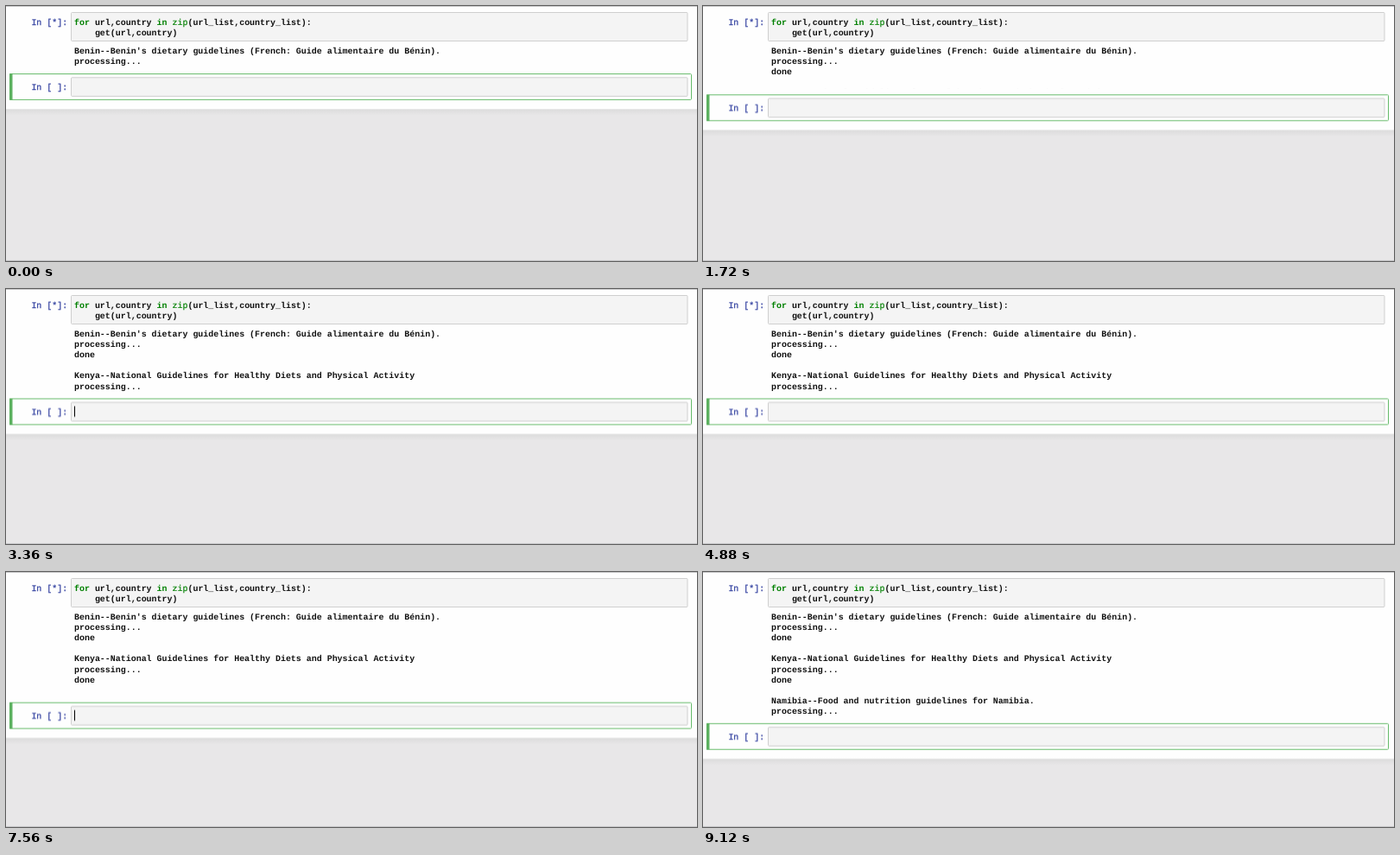
Recreate the animation shown at these times as an HTML page. Size 800 by 295 pixels, loop 9400 ms.

```html
<!DOCTYPE html>
<html lang="en">
<head>
<meta charset="utf-8">
<title>Notebook run</title>
<style>
  html, body { margin: 0; width: 100%; height: 100%; overflow: hidden; background: #e8e7e8; }
  svg { display: block; width: 800px; height: 295px; }
  text {
    font: bold 9.965px "Liberation Mono", "Courier New", monospace;
    white-space: pre;
    text-rendering: geometricPrecision;
    fill: #111;
  }
  .key { fill: #008000; }
  .builtin { fill: #008000; font-weight: normal; stroke: #008000; stroke-width: .2px; }
  .prompt { fill: #303f9f; font-weight: normal; stroke: #303f9f; stroke-width: .25px; }
  .page { fill: #fefefe; }
  .input { fill: #f4f4f4; stroke: #cfcfcf; }
  .edit { fill: none; stroke: #66bb6a; }
  .bar { fill: #5cb160; }
  .edge { fill: #c8c8ca; }

  /* The cell drops two text lines each time output is added. */
  #rest { animation: drop 9.4s step-end infinite; }
  #caret { fill: #000; animation: blink 9.4s step-end infinite; }

  @keyframes drop {
    0% { transform: translateY(0); }
    6.38% { transform: translateY(24.2px); }
    35.74% { transform: translateY(48.4px); }
    55.31% { transform: translateY(72.6px); }
    81.27%, 100% { transform: translateY(96.8px); }
  }
  @keyframes blink {
    0%, 6.8%, 18.29%, 29.36%, 40.85%, 51.91%, 63.4%, 74.46%, 85.53%, 97.02%, 100% { opacity: 0; }
    1.27%, 12.34%, 23.82%, 34.89%, 46.38%, 57.44%, 68.93%, 80%, 91.48% { opacity: 1; }
  }
</style>
</head>
<body>
<svg viewBox="0 0 800 295">
  <defs>
    <linearGradient id="shade" x2="0" y2="1">
      <stop stop-color="#dcdcdc"/>
      <stop offset="1" stop-color="#e8e7e8"/>
    </linearGradient>
  </defs>
  <rect class="page" width="800" height="295"/>

  <rect class="input" x="75.5" y="7.5" width="713.5" height="33" rx="1"/>
  <text class="prompt" x="29.4" y="22">In [*]:</text>
  <text x="79" y="22"><tspan class="key">for</tspan> url,country <tspan class="key">in</tspan> <tspan class="builtin">zip</tspan>(url_list,country_list):</text>
  <text x="79" y="34">    get(url,country)</text>

  <g id="output">
    <text x="79" y="55">Benin--Benin's dietary guidelines (French: Guide alimentaire du Bénin).</text>
    <text x="79" y="67.1">processing...</text>
    <text x="79" y="79.2">done</text>
    <text x="79" y="103.4">Kenya--National Guidelines for Healthy Diets and Physical Activity</text>
    <text x="79" y="115.5">processing...</text>
    <text x="79" y="127.6">done</text>
    <text x="79" y="151.8">Namibia--Food and nutrition guidelines for Namibia.</text>
    <text x="79" y="163.9">processing...</text>
  </g>

  <!-- Opaque, so it hides the lines not printed yet. -->
  <g id="rest">
    <rect class="page" y="70.3" width="800" height="50"/>
    <rect fill="#e8e7e8" y="119.5" width="800" height="180"/>
    <rect fill="url(#shade)" y="119.5" width="800" height="7"/>
    <rect class="edit" x="4.5" y="78.6" width="789" height="29.8" rx="1"/>
    <rect class="bar" x="4" y="78.2" width="3.5" height="30.6"/>
    <rect class="input" x="75.5" y="82.8" width="713.5" height="21.6" rx="1"/>
    <text class="prompt" x="29.4" y="97.2">In [ ]:</text>
    <rect id="caret" x="79" y="87.2" width="1" height="12.2"/>
  </g>

  <rect class="edge" width="800" height="1"/>
  <rect class="edge" y="294" width="800" height="1"/>
</svg>
</body>
</html>
```
